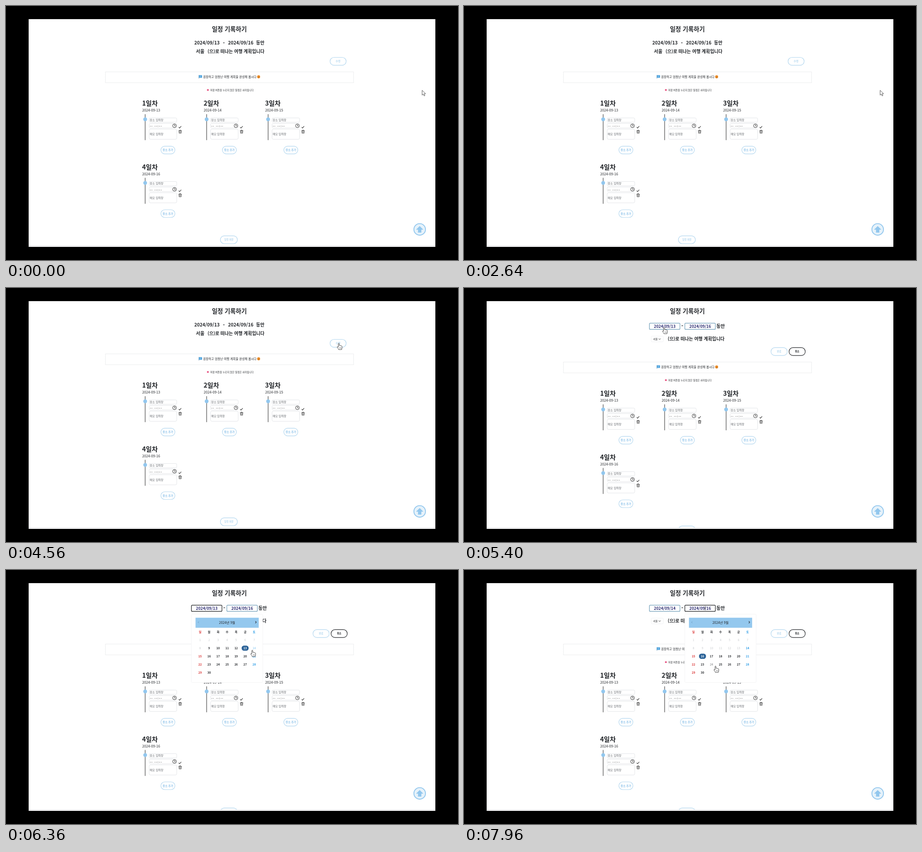
An HTML page for the animation above (8000 ms loop, 998 by 561 pixels).

```html
<!DOCTYPE html>
<html lang="ko">
<head>
<meta charset="utf-8">
<title>일정 기록하기</title>
<style>
html, body { margin: 0; width: 100%; height: 100%; overflow: hidden; background: #000; }
svg { display: block; width: 100%; height: 100%; }
text { font-family: "Noto Sans CJK KR", "Noto Sans CJK", "Noto Sans", sans-serif; white-space: pre; }
.mono { font-family: "Liberation Mono", monospace; }
</style>
</head>
<body>
<svg id="stage" viewBox="0 0 998 561" xmlns="http://www.w3.org/2000/svg"></svg>
<script>
const LOOP = 8000;
const EDIT = 4680, OPEN1 = 5760, PICK1 = 6840, OPEN2 = 7480;
const INK = '#24272b', BLUE = '#92c7ee', PALE = '#b3d7ef', NAVY = '#2a2a70', GREY = '#5f6368';

// Text placed by its visual middle
const text = (x, cy, str, size, { w = 400, fill = INK, a = 'start', more = '' } = {}) =>
  `<text x="${x}" y="${(cy + size * 0.37).toFixed(2)}" font-size="${size}" font-weight="${w}" fill="${fill}" text-anchor="${a}" ${more}>${str}</text>`;
const box = (x, y, w, h, r, stroke, sw = 0.8, fill = '#fff', more = '') =>
  `<rect x="${x}" y="${y}" width="${w}" height="${h}" rx="${r}" fill="${fill}" stroke="${stroke}" stroke-width="${sw}" ${more}/>`;
const line = (d, stroke, sw, more = '') =>
  `<path d="${d}" fill="none" stroke="${stroke}" stroke-width="${sw}" ${more}/>`;
const group = (id, body, more = '') => `<g id="${id}" ${more}>${body}</g>`;
const pill = (x, y, w, h, label, size, stroke, fill, weight = 700) =>
  box(x, y, w, h, h / 2, stroke, 1.2) + text(x + w / 2, y + h / 2, label, size, { w: weight, fill, a: 'middle' });

function dayCard(n, x, y) {
  return `<g transform="translate(${x} ${y})">` +
    text(300.5, 215, n + '일차', 14.2, { w: 700 }) +
    text(300.8, 230.3, '2024-09-' + (12 + n), 7.7) +
    line('M307.3 239V296.3', '#555', 1.3) +
    `<circle cx="307.3" cy="250.3" r="4.2" fill="${BLUE}"/>` +
    box(316, 247.2, 61, 9.6, 2.5, '#dcdfe2') +
    text(317.3, 251.7, '장소 입력창', 6.2, { fill: GREY }) +
    box(316, 259.4, 61, 10, 2.5, '#dcdfe2') +
    text(317, 265, '-- --:--', 5.7, { w: 700, fill: '#333', more: 'class="mono"' }) +
    line('M376 264.5a4 4 0 1 1-8 0a4 4 0 1 1 8 0M372 261.8v2.9h2', '#333', 1) +
    box(316, 272, 61, 22.4, 3, '#dcdfe2') +
    text(317.3, 283, '메모 입력창', 6.2, { fill: GREY }) +
    line('M381.3 267.6l2 2 3.6-4.2', '#333', 1.1) +
    line('M381 275.4h7M383.2 275.4v-1.2h2.6v1.2M381.9 275.4l.3 5.6h4.6l.3-5.6M383.7 277.2v2.2M385.3 277.2v2.2', '#333', 0.9) +
    pill(342, 309.6, 31, 17, '장소 추가', 5.9, PALE, '#8fc3ea') +
    '</g>';
}

function content() {
  let s = box(219.5, 145.5, 548, 24, 0, '#d3d6d9', 0.8, '#fff', 'stroke-dasharray="1.2 1"');
  s += line('M426 152.6V160', '#4a7fa8', 0.9) +
    '<path d="M426 152.8h6.8v5.6H426z" fill="#48a0dc"/>' +
    line('M427.6 154.8h3.4M427.6 156.5h2.4', '#d8eefb', 0.6);
  s += text(434.9, 156.4, '굉장하고 엄청난 여행 계획을 완성해 봅시다', 6.58, { w: 500 });
  s += '<circle cx="557.8" cy="156.4" r="3.3" fill="#f0912a"/>' +
    line('M556 157.2q1.8 2 3.6 0M556.5 154.8v1M559.1 154.8v1', '#7a3a10', 0.6);
  s += '<path d="M445.8 183.4l.8 1.3 1.4.8-1.4.8-.8 1.3-.8-1.3-1.4-.8 1.4-.8z" fill="#e0245e" stroke="#e0245e" stroke-width=".5"/>';
  s += text(451, 186.5, '저장 버튼을 누르지 않은 일정은 사라집니다', 5.32, { w: 500 });
  for (let i = 0; i < 4; i++) s += dayCard(i + 1, i % 3 * 135.7, i > 2 ? 140.4 : 0);
  return s + pill(473.3, 507.6, 37.6, 17.4, '일정 저장', 5.2, PALE, PALE);
}

const viewHead =
  text(415.8, 81.7, '2024/09/13', 10.2, { w: 700 }) +
  text(481, 81.7, '-', 12, { w: 700, a: 'middle' }) +
  text(490.3, 81.7, '2024/09/16', 10.2, { w: 700 }) +
  text(552, 81.7, '동안', 10.2, { w: 700 }) +
  text(419.3, 100.7, '서울', 10.2, { w: 700 }) +
  text(445, 100.7, '(으)로 떠나는 여행 계획입니다', 9.95, { w: 700 }) +
  pill(715.5, 113.5, 35.5, 17.4, '수정', 5.6, PALE, PALE);

const field = (n, x, value) =>
  box(x, 77.6, 67.4, 13.8, 2, '#6f9db8', 1.2, '#fff', `id="field${n}"`) +
  text(x + 33.8, 84.3, value, 8.7, { w: 700, fill: NAVY, a: 'middle', more: `id="date${n}"` }) +
  line(`M${x + (n > 1 ? 44.6 : 33.5)} 79.5v9.5`, '#222', 0.8, `id="caret${n}"`);

const editHead =
  field(1, 409.4, '2024/09/13') + field(2, 487.6, '2024/09/16') +
  text(482, 83.6, '-', 12, { w: 700, a: 'middle' }) +
  text(557.2, 84, '동안', 10.2, { w: 700 }) +
  box(413.4, 106.3, 26.6, 12.6, 2, '#eceef0') +
  text(417.4, 112.5, '서울', 5.6, { w: 500 }) +
  line('M429.7 111.6l2.3 2.2 2.3-2.2', '#333', 0.9) +
  text(449.7, 112, '(으)로 떠나는 여행 계획입니다', 9.95, { w: 700 }) +
  pill(677.8, 131.7, 36, 17.4, '완료', 5.4, PALE, PALE) +
  pill(717.7, 131.7, 35.8, 17.4, '취소', 5.4, INK, INK);

const cellX = d => 428.5 + (d - 1) % 7 * 19.9;
const cellY = d => 154.6 + Math.floor((d - 1) / 7) * 17.9;
const dayColor = col => col === 0 ? '#d92d2d' : col === 6 ? '#2a9be6' : INK;

function calendar(n, dx, first, picked) {
  const mid = (x, y, s, size, fill, w = 700, more = '') => text(x, y, s, size, { w, fill, a: 'middle', more });
  let s = box(409.3, 97.5, 157.6, 151, 2, '#f1f2f3', 0.8) +
    `<rect x="418.5" y="105.4" width="139.5" height="22.2" fill="#94c8ee"/>` +
    mid(488.2, 116.6, '2024년 9월', 7.3, INK, 500) +
    line('M425.9 113.6l-1.8 1.8 1.8 1.8', '#5d8fb4', 0.8) +
    line('M550.6 113l2 2.3-2 2.3', INK, 1.1);
  [...'일월화수목금토'].forEach((c, i) => s += mid(428.5 + i * 19.9, 136.6, c, 6.2, dayColor(i)));
  for (let d = 1; d <= 30; d++) {
    const x = cellX(d), y = cellY(d), off = d < first;
    if (d === picked) s += `<rect x="${x - 7.7}" y="${y - 5.6}" width="15.4" height="11.4" rx="5.2" fill="#2b6297"/>`;
    s += mid(x, y, d, 6.3, d === picked ? '#fff' : off ? '#c6c9cc' : dayColor((d - 1) % 7), off ? 400 : 700, `id="c${n}d${d}"`);
  }
  return group('cal' + n, s, `transform="translate(${dx} 0)"`);
}

const cursors = {
  arrow: '<path d="M0 0V10.6l2.5-2.2 1.8 4 1.9-.8-1.8-3.9 3.3-.2z" fill="#fff" stroke="#444" stroke-width=".9" stroke-linejoin="round"/>',
  plane: '<path transform="translate(6.5 6.2) rotate(62)" d="M0-6.6C.9-6.6 1-5.4 1-4.6V-1.8L6 1.4V2.8L1 1.4V4L2.6 5.3V6.3L0 5.6-2.6 6.3V5.3L-1 4V1.4L-6 2.8V1.4L-1-1.8V-4.6C-1-5.4-.9-6.6 0-6.6z" fill="#6fa9d2"/>',
  hand: '<path d="M-1.3 1.2C-1.3-.3 .9-.3 .9 1.2V5.2C1.3 4.4 2.8 4.5 3 5.5 3.6 4.9 4.9 5 5.1 6.1 5.8 5.6 7 6 7 7.2V10.2C7 11.6 6.2 12.3 6.1 14H-.6C-.8 12.4-2.4 11.1-3.4 9.4-4.3 8-3 7.1-2 8.1L-1.3 8.8z" fill="#fff" stroke="#333" stroke-width=".9" stroke-linejoin="round"/><path d="M1.6 9.2v2.6M3.2 9.2v2.6M4.8 9.2v2.6" stroke="#555" stroke-width=".6"/>',
  beam: line('M-3.2-5.8h2.4q.8 0 .8.8V5q0 .8-.8.8h-2.4M3.2-5.8H.8Q0-5.8 0-5V5q0 .8.8.8h2.4', '#222', 1.1)
};

document.getElementById('stage').innerHTML =
  '<defs><clipPath id="page"><rect x="50" y="29" width="898" height="500.3"/></clipPath></defs>' +
  '<rect width="998" height="561" fill="#000"/><rect x="50" y="29" width="898" height="503" fill="#fff"/>' +
  text(493.2, 51, '일정 기록하기', 13.3, { w: 700, a: 'middle' }) +
  group('view', viewHead) + group('edit', editHead) +
  `<g clip-path="url(#page)">${group('content', content())}</g>` +
  line('M50 529.6H948', '#d5d8da', 0.9) +
  `<circle cx="913.4" cy="493.4" r="12.8" fill="#e6f2fa" stroke="${BLUE}" stroke-width="1.9"/>` +
  `<path d="M913.4 486l8 8h-4.3v6.4h-7.4V494h-4.3z" fill="${BLUE}"/>` +
  calendar(1, 0, 9, 13) + calendar(2, 78.2, 14, 16) +
  group('cursor', Object.keys(cursors).map(k => group(k, cursors[k])).join(''));

const $ = id => document.getElementById(id);
const show = (id, on) => $(id).style.display = on ? '' : 'none';

// Pointer stops: time, x, y
const path = [
  [0, 918.8, 186.2], [3280, 918.8, 186.2], [3400, 898, 180.5], [3560, 865, 171], [3900, 785, 142],
  [4300, 735, 122], [4760, 735, 122], [5080, 620, 107], [5400, 442, 87], [5760, 442, 86.6],
  [6080, 490, 128], [6360, 544, 177], [6820, 546, 173], [7120, 537, 96], [7360, 532.5, 86.5],
  [7520, 532.5, 86.5], [7960, 555.5, 212], [8000, 556, 213]
];
// Pointer shapes with the time each one ends
const kinds = [[3320, 'arrow'], [4230, 'plane'], [4800, 'hand'], [5320, 'plane'], [6880, 'hand'], [7540, 'beam'], [LOOP, 'hand']];

const rate = (i, k) => (path[i + 1][k] - path[i][k]) / (path[i + 1][0] - path[i][0]);
function slope(i, k) {
  if (i === 0 || i === path.length - 1) return 0;
  const a = rate(i - 1, k), b = rate(i, k);
  return a * b > 0 ? 2 * a * b / (a + b) : 0;
}
function pointer(t) {
  let i = 0;
  while (i < path.length - 2 && t >= path[i + 1][0]) i++;
  const p = path[i], q = path[i + 1], h = q[0] - p[0], u = (t - p[0]) / h;
  return [1, 2].map(k =>
    p[k] + (q[k] - p[k]) * u * u * (3 - 2 * u) +
    h * u * (1 - u) * (slope(i, k) * (1 - u) - slope(i + 1, k) * u));
}

function hover(n, dx, x, y, first, picked) {
  for (let d = first; d <= 30; d++) {
    if (d === picked) continue;
    const on = Math.abs(x - dx - cellX(d)) < 9.9 && Math.abs(y - cellY(d)) < 8.9;
    const el = $(`c${n}d${d}`);
    el.setAttribute('opacity', on ? 0.65 : 1);
    el.setAttribute('font-weight', on ? 400 : 700);
  }
}

function draw(t) {
  const editing = t >= EDIT, cal1 = t >= OPEN1 && t < PICK1, cal2 = t >= OPEN2;
  const [x, y] = pointer(t);
  show('view', !editing);
  show('edit', editing);
  $('content').setAttribute('transform', `translate(0 ${editing ? 18 : 0})`);
  [[1, cal1, OPEN1], [2, cal2, OPEN2]].forEach(([n, open, since]) => {
    show('cal' + n, open);
    show('caret' + n, open && (t - since) % 1000 < 500);
    $('field' + n).setAttribute('stroke', open ? '#16181b' : '#6f9db8');
  });
  $('date1').textContent = t < PICK1 ? '2024/09/13' : '2024/09/14';
  if (cal1) hover(1, 0, x, y, 9, 13);
  if (cal2) hover(2, 78.2, x, y, 14, 16);
  const kind = kinds.find(k => t < k[0])[1];
  for (const k in cursors) show(k, k === kind);
  $('cursor').setAttribute('transform', `translate(${x.toFixed(2)} ${y.toFixed(2)})`);
}

const start = performance.now();
function tick() {
  draw((performance.now() - start) % LOOP);
  requestAnimationFrame(tick);
}
tick();
</script>
</body>
</html>
```
